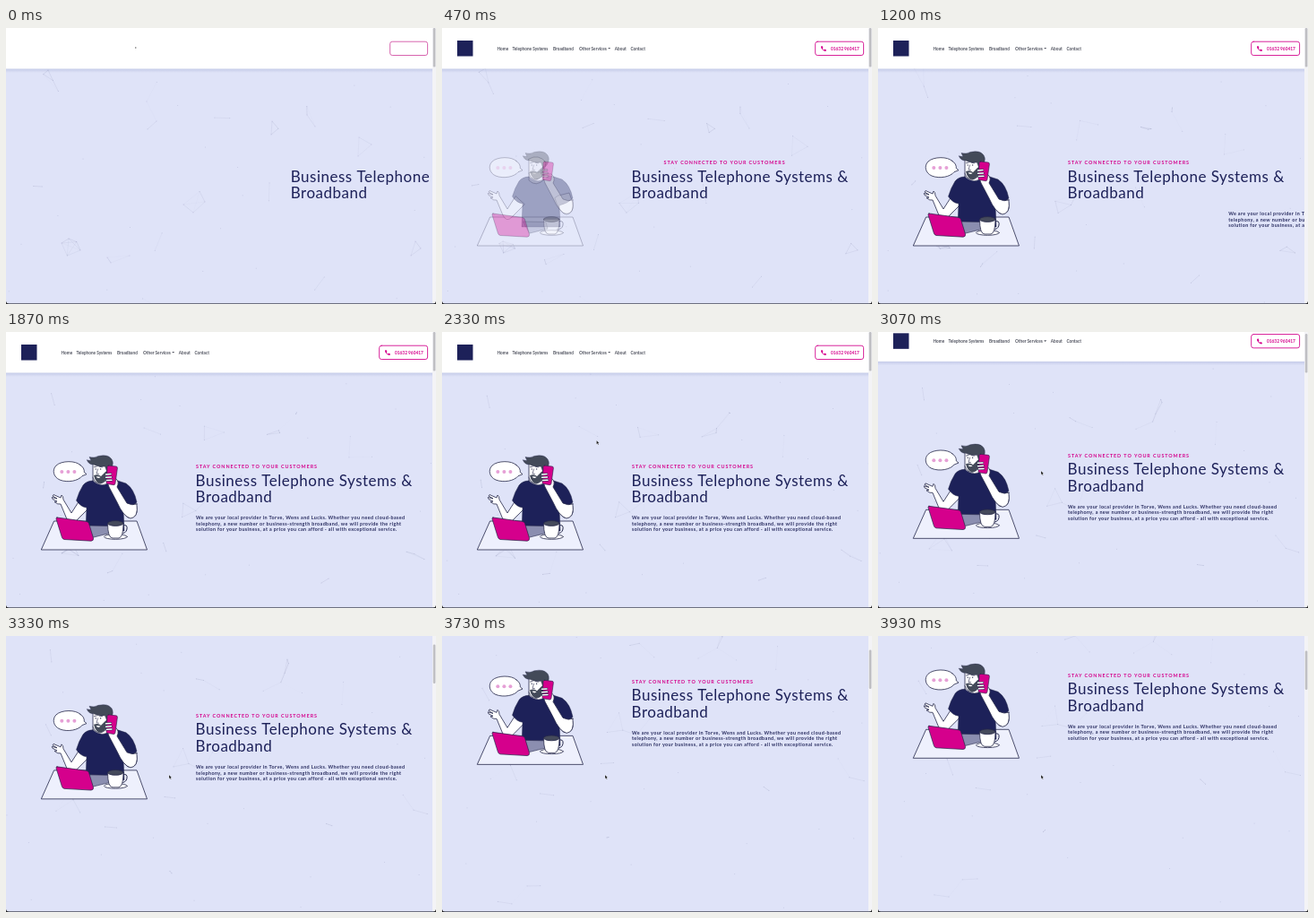
Animation, 480 px wide and 308 px high, one loop 3990 ms. Source, as an HTML page with a canvas:

```html
<!DOCTYPE html>
<html lang="en">
<head>
<meta charset="utf-8">
<title>Business Telephone Systems</title>
<style>
html, body { margin: 0; width: 100%; height: 100%; overflow: hidden; background: #dfe3f8; }
canvas { display: block; width: 480px; height: 308px; }
</style>
</head>
<body>
<canvas id="stage"></canvas>
<script>
const W = 480, H = 308, LOOP = 3990, FRAMES = 60;
const NAVY = '#1d2159', PINK = '#d5008c', INK = '#252849', BG = '#dfe3f8', HAIR = '#434a59';
const FAMILY = 'Lato, "Open Sans", sans-serif';
const canvas = document.getElementById('stage');
const ctx = canvas.getContext('2d');
const dpr = Math.max(1, window.devicePixelRatio || 1);
canvas.width = W * dpr;
canvas.height = H * dpr;

const clamp = v => Math.max(0, Math.min(1, v));
const fade = (t, from, to) => clamp((t - from) / (to - from));

// Piecewise path through [time, value] stops
function along(stops, t) {
  if (t <= stops[0][0]) return stops[0][1];
  for (let i = 1; i < stops.length; i++) {
    const [t0, v0] = stops[i - 1], [t1, v1] = stops[i];
    if (t <= t1) return v0 + (v1 - v0) * (t - t0) / (t1 - t0);
  }
  return stops[stops.length - 1][1];
}

const scrollStops = [[3000, 0], [3070, 13.3], [3200, 38], [3330, 60.7], [3470, 79],
                     [3600, 91], [3730, 99.5], [3860, 104.8], [3930, 106.7]];
const cursorX = [[2060, 165], [2330, 172.4], [2670, 182]];
const cursorY = [[2060, 7], [2200, 72], [2330, 120.5], [2500, 145], [2670, 155]];

const slideIn = (t, start) => 350 * (1 - clamp((t - start) / 500)) ** 3;

function text(str, x, y, size, color, weight = 400, spacing = 0) {
  ctx.font = `${weight} ${size}px ${FAMILY}`;
  ctx.letterSpacing = spacing + 'px';
  ctx.fillStyle = color;
  ctx.fillText(str, x, y);
}

function shape(d, fill, stroke, width = 0.8) {
  const p = new Path2D(d);
  if (fill) { ctx.fillStyle = fill; ctx.fill(p); }
  if (stroke) { ctx.strokeStyle = stroke; ctx.lineWidth = width; ctx.stroke(p); }
}

function oval(x, y, rx, ry, fill, stroke, width = 0.8) {
  ctx.beginPath();
  ctx.ellipse(x, y, rx, ry, 0, 0, Math.PI * 2);
  if (fill) { ctx.fillStyle = fill; ctx.fill(); }
  if (stroke) { ctx.strokeStyle = stroke; ctx.lineWidth = width; ctx.stroke(); }
}

// Drifting dots joined by faint lines
let seed = 29;
const rnd = () => (seed = (seed * 16807) % 2147483647) / 2147483647;
const clusters = [[62, 240], [70, 235], [83, 248], [113, 256], [117, 262], [138, 254],
  [198, 197], [209, 206], [222, 194], [394, 122], [408, 130], [393, 143],
  [452, 254], [457, 238], [463, 246], [157, 82], [168, 104], [336, 97], [345, 110], [297, 104], [296, 119]];
const dots = clusters.concat(Array.from({ length: 62 }, () => [rnd() * 480, 46 + rnd() * 390]))
  .map(([x, y]) => ({ x, y, vx: (rnd() - 0.5) * 14, vy: (rnd() - 0.5) * 14 }));

function network(t) {
  const reach = 28, s = t / 1000;
  const pts = dots.map(d => [d.x + d.vx * s, d.y + d.vy * s]);
  ctx.lineWidth = 0.5;
  pts.forEach(([x, y], i) => {
    ctx.fillStyle = 'rgba(80,85,130,.22)';
    ctx.fillRect(x - 0.4, y - 0.4, 0.8, 0.8);
    for (let j = 0; j < i; j++) {
      const d = Math.hypot(x - pts[j][0], y - pts[j][1]);
      if (d > reach) continue;
      ctx.strokeStyle = `rgba(90,95,135,${0.34 * (1 - d / reach)})`;
      ctx.beginPath();
      ctx.moveTo(x, y);
      ctx.lineTo(pts[j][0], pts[j][1]);
      ctx.stroke();
    }
  });
}

function handset(x, y, s) {
  ctx.save();
  ctx.translate(x, y);
  ctx.scale(s, s);
  shape('M-3 -2.4L-1.5 -3L-.5 -.8L-1.3 -.1Q-.7 1 .3 1.5L1 .6L3 1.6L2.5 3Q.8 3.4 -1.3 1.3Q-3.4 -.9 -3 -2.4Z', PINK);
  ctx.restore();
}

function header(ready) {
  const g = ctx.createLinearGradient(0, 45, 0, 50);
  g.addColorStop(0, 'rgba(150,160,205,.4)');
  g.addColorStop(1, 'rgba(150,160,205,0)');
  ctx.fillStyle = g;
  ctx.fillRect(0, 45, 476, 5);
  ctx.fillStyle = '#fff';
  ctx.fillRect(0, -2, 476, 47.5);

  const left = ready ? 416.7 : 428.7;
  ctx.beginPath();
  ctx.roundRect(left, 15.2, 470.6 - left, 15.3, 2.5);
  ctx.strokeStyle = ready ? '#d8239a' : '#d765ae';
  ctx.lineWidth = 1;
  ctx.stroke();
  if (!ready) {
    ctx.fillStyle = '#444';
    ctx.fillRect(144, 21.5, 1.4, 1);
    return;
  }
  ctx.fillStyle = NAVY;
  ctx.fillRect(17, 14, 17.5, 17.5);
  const items = [['Home', 61.5], ['Telephone Systems', 78.5], ['Broadband', 124],
                 ['Other Services', 153], ['About', 192.8], ['Contact', 210.5]];
  for (const [label, x] of items) text(label, x, 24.5, 4.7, '#50535f', 700);
  shape('M185.2 22H188.2L186.7 23.6Z', '#50535f');
  handset(426, 23, 1);
  text('01632 960417', 434, 24.7, 4.8, PINK, 700);
}

function bubble() {
  shape('M83 148.5C78 143.2 62 143.3 56 149C51 154 53 162 60 165C69 168.6 81 166 85 160.7L90 158.7L87.3 156.5C87.7 153.4 86 150.4 83 148.5Z', '#fff', INK);
  for (const x of [62.3, 69.4, 76.4]) oval(x, 156, 2, 2, '#e6a0d6');
}

function caller() {
  ctx.lineJoin = ctx.lineCap = 'round';
  shape('M54 211H146L157.5 243H39.7Z', '#eef0fd', INK);
  bubble();
  // raised arm on the left
  shape('M82 188L73 202L64 187Q64 183 62 182L61 185L53 181.5L52 183L57 186L51.3 184.5L52 186.5L57 189L54 189.5Q58 193 61 192L68 209Q72 217 78 211L92 197Z', '#fff', INK);
  // far upper arm
  shape('M130 187L142 184L146 195Q148 209 136 207Q130 203 126 190Z', '#fff', INK);
  shape('M97 162L97 170Q105 178 114 169L113 161Z', '#fff', INK);
  // shirt
  shape('M97 166Q90 166 86 171Q81 179 78.5 188Q83 195 90 196L89 222H132L131 198Q140 196 146 190Q143 175 134 169L120 164.5Q108 176 97 166Z', NAVY, INK, 0.5);
  // forearm and hand with phone
  shape('M146 192Q148 207 139 208Q131 206 124 190L115 173Q112 167 114 163L122 163Q127 167 124 173L135 191Q141 194 146 192Z', '#fff', INK);
  // head
  shape('M97 149L97 162Q99 169 105 169Q112 168 114 160L116 150Q108 140 97 146Z', '#fff', INK);
  shape('M98 160Q103 158 106 161L111 156L114 154Q114 167 106 169Q100 169 98 160Z', HAIR);
  shape('M100.5 161.5Q103.5 160.7 105.5 162Q103 164.3 100.5 161.5Z', '#fff');
  shape('M90.5 143L95 143.5L93 139.5Q99 141 103 138.5Q114 136 118 142Q121 147 117 153L113 157L110.5 150Q103 151 98 148Q92 148 90.5 143Z', HAIR, INK, 0.4);
  oval(100.2, 153, 0.6, 0.8, INK);
  oval(105.7, 153, 0.6, 0.8, INK);
  shape('M102.5 153L101 158L103.5 158.3', null, INK, 0.6);
  shape('M98.5 150.7L101 150.2M104.5 150.3L107.5 150.8', null, INK, 0.7);
  shape('M114.5 149L123 150Q124.5 150.2 124.4 152L122 169Q121.6 171 120 170.7L113 169.5Q111.7 169 112 167.5L113 150.3Q113.2 149 114.5 149Z', PINK, INK, 0.6);
  shape('M111.5 159L117 158.6M111.5 162.3L117.5 162M112.5 165.5L118 165.2', null, INK, 2.5);
  shape('M111.5 159L117 158.6M111.5 162.3L117.5 162M112.5 165.5L118 165.2', null, '#fff', 1.5);
  // laptop
  shape('M91 216L116 216.5L118 224L98 229Z', '#8b8eb0', INK, 0.6);
  shape('M57 207L90 211.5Q92 212 92.5 213.5L97.5 230Q98 233 95 233.2L65 231.5Q63 231 62.4 229L56 208.5Q55.8 207 57 207Z', PINK, INK, 0.7);
  // cup
  oval(122.5, 228.5, 13, 2.8, '#fff', INK);
  shape('M130 216Q136 214 135 220Q134 225 128 225', null, INK, 1);
  shape('M113.5 213.5Q113.5 230 119 230H126Q131 229 131 213.5Z', '#fff', INK);
  oval(122.3, 213.5, 8.8, 2.9, '#454a5b', INK);
}

const copy = [
  'We are your local provider in Torve, Wens and Lucks. Whether you need cloud-based',
  'telephony, a new number or business-strength broadband, we will provide the right',
  'solution for your business, at a price you can afford - all with exceptional service.'
];

function hero(t) {
  ctx.globalAlpha = fade(t, 330, 730);
  if (ctx.globalAlpha > 0) caller();
  ctx.globalAlpha = 1;

  const hx = 211.6 + slideIn(t, -164);
  text('Business Telephone Systems &', hx, 171.6, 17, NAVY, 400, 0.5);
  text('Broadband', hx, 190.4, 17, NAVY, 400, 0.5);
  if (t > 200) text('STAY CONNECTED TO YOUR CUSTOMERS', 212 + slideIn(t, 200), 152.2, 5.4, PINK, 700, 0.93);
  if (t > 1100) {
    const px = 212 + slideIn(t, 1100);
    copy.forEach((line, i) => text(line, px, 209.3 + i * 6.5, 5.4, '#292d60', 700, 0.38));
  }
}

function chrome(scroll) {
  ctx.fillStyle = '#f3f3f6';
  ctx.fillRect(476, 0, 4, H);
  ctx.fillStyle = '#bfbfc3';
  ctx.beginPath();
  ctx.roundRect(476.8, scroll * 0.155, 2.6, 43.5, 1.2);
  ctx.fill();
  ctx.fillStyle = '#6d7080';
  ctx.fillRect(0, 307, W, 1);
  shape('M0 305V308H3Q.5 307.5 0 305ZM480 305V308H477Q479.5 307.5 480 305Z', '#222');
}

function pointer(t) {
  if (t < 2060) return;
  ctx.save();
  ctx.translate(along(cursorX, t), along(cursorY, t));
  shape('M0 0V4.2L1 3.4L1.8 5L2.5 4.6L1.8 3.1H3Z', '#111', '#fff', 0.3);
  ctx.restore();
}

function draw(t) {
  const scroll = along(scrollStops, t);
  ctx.setTransform(dpr, 0, 0, dpr, 0, 0);
  ctx.fillStyle = BG;
  ctx.fillRect(0, 0, W, H);
  ctx.save();
  ctx.beginPath();
  ctx.rect(0, 0, 476, H);
  ctx.clip();
  ctx.translate(0, -scroll);
  network(t);
  hero(t);
  header(t >= 60);
  ctx.restore();
  chrome(scroll);
  pointer(t);
}

const begin = performance.now();
function tick() {
  const t = (performance.now() - begin) % LOOP;
  draw(Math.floor(t / LOOP * FRAMES) * 1000 / 15);
  requestAnimationFrame(tick);
}
tick();
</script>
</body>
</html>
```
